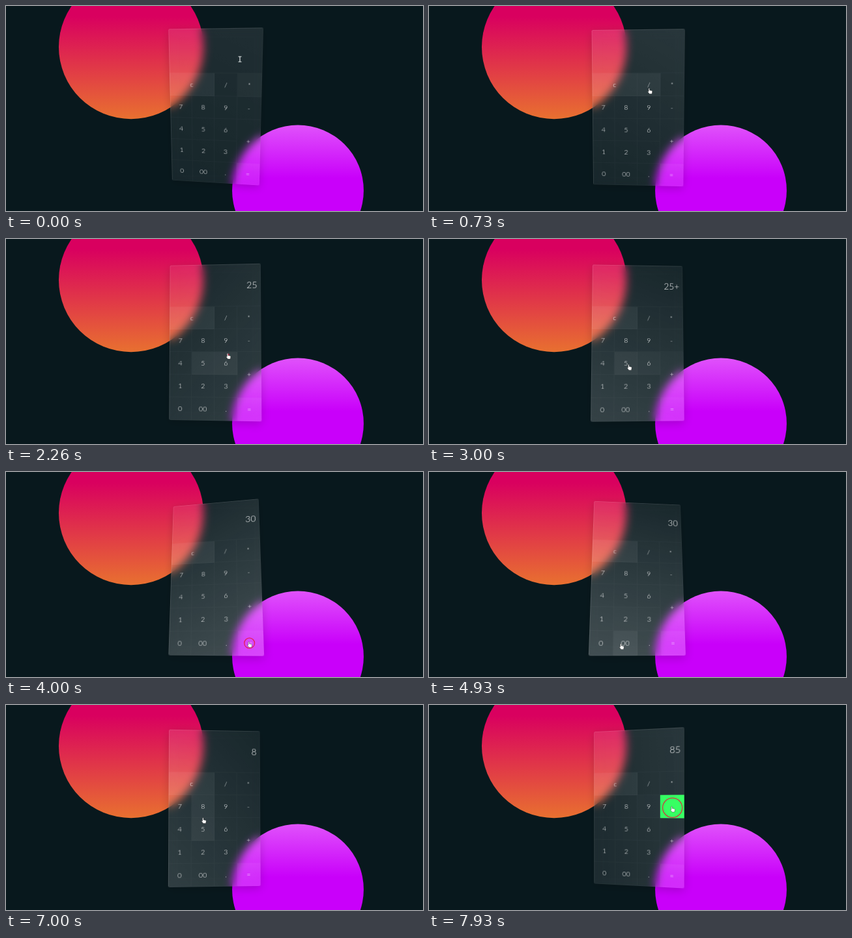
An HTML page for the animation above (8 s loop, 640 px wide and 316 px high).

```html
<!DOCTYPE html>
<html lang="en">
<head>
<meta charset="utf-8">
<title>Glass calculator</title>
<style>
  html, body { margin: 0; width: 100%; height: 100%; overflow: hidden; background: #08181d; }
  #stage { position: relative; width: 640px; height: 316px; overflow: hidden; }
  .ball { position: absolute; inset: 0; }
  .warm { background: linear-gradient(#d9005f 5%, #e87030 55%); clip-path: circle(22% at 30% 20%); }
  .violet { background: linear-gradient(#e052fb 58%, #c900fa 84%); clip-path: circle(20% at 70% 90%); }
  #card {
    position: absolute; left: 249.7px; top: 38px; width: 140.6px; height: 241.2px;
    border-radius: 3px; background: rgba(255,255,255,.06);
    backdrop-filter: blur(7px);
    box-shadow: 0 4px 14px rgba(0,0,0,.17), inset .5px .5px 0 rgba(255,255,255,.2);
    font-family: Lato, sans-serif; font-weight: 300; color: #fff;
  }
  #keys { position: absolute; inset: 0; display: grid;
    grid-template: 65.7px repeat(5, 35.1px) / repeat(4, 35.15px); }
  #keys div { display: flex; align-items: center; justify-content: center; box-sizing: border-box;
    border: solid rgba(255,255,255,.025); border-width: 0 1px 1px 0; font-size: 10.5px; }
  #keys #value { grid-column: span 4; justify-content: flex-end; padding: 1px 4px 0 0; font-size: 14px; }
  .c { grid-column: span 2; }
  .plus { grid-row: span 2; }
  #glare { position: absolute; inset: 0; overflow: hidden; border-radius: 3px; }
  #glare i { position: absolute; left: -70.3px; top: -20px; width: 281.2px; height: 281.2px;
    background: linear-gradient(0deg, rgba(255,255,255,0), #fff); }
  #overlay { position: absolute; left: 0; top: 0; }
</style>
</head>
<body>
<div id="stage">
  <div class="ball warm"></div>
  <div class="ball violet"></div>
  <div id="card">
    <div id="keys"><div id="value"></div></div>
    <div id="glare"><i></i></div>
  </div>
  <svg id="overlay" width="640" height="316">
    <g id="pointer">
      <circle id="ring" cx="1" cy="2" fill="none" stroke="#e6183c" stroke-opacity=".85" stroke-width="1.3"/>
      <path id="hand" fill="#fff" stroke="#222" stroke-width=".4"
        d="M-.8 .3Q0 -.6 .7 .3V3L4 3.7Q5 4 4.8 5.2L4.2 8.6H.4L-2.2 5.2Q-2.3 4.2 -.8 5Z"/>
      <path id="beam" fill="none" stroke="#dfe5e6" stroke-width="1.2"
        d="M-2.5 -4H-.6L0 -3.5L.6 -4H2.5M-2.5 4H-.6L0 3.5L.6 4H2.5M0 -3.5V3.5"/>
    </g>
  </svg>
</div>
<script>
const $ = id => document.getElementById(id);
const LOOP = 8000, FPS = 15, FADE = 500, HOLD = 100;
const MAX_TILT = 15, MAX_GLARE = .2;
const LEFT = 249.7, TOP = 38, WIDTH = 140.6, HEIGHT = 241.2, GRID_TOP = 103.7, CELL = 35.13;
const ARRIVE = 180, LEAVE = 200, BOW = .35;

const layout = ['c c / *', '7 8 9 -', '4 5 6 +', '1 2 3 +', '0 00 . =']
  .map(row => row.split(' '));
const tinted = ['c', '='];

const keys = {};
for (const label of new Set(layout.flat())) {
  const key = keys[label] = document.createElement('div');
  key.textContent = label;
  if (label === 'c') key.className = 'c';
  if (label === '+') key.className = 'plus';
  $('keys').append(key);
}

// Middle of all cells that a key covers
function centreOf(label) {
  const cells = layout.flatMap((row, r) =>
    row.flatMap((name, c) => name === label ? [[c, r]] : []));
  const mean = axis => cells.reduce((sum, cell) => sum + cell[axis] + .5, 0) / cells.length;
  return { x: LEFT + mean(0) * CELL, y: GRID_TOP + mean(1) * CELL };
}

function press(at, label, dx = 0, dy = 0) {
  const { x, y } = centreOf(label);
  return { at, label, x: x + dx, y: y + dy };
}

const presses = [
  press(1580, '2', 6, 4), press(2030, '5'), press(2480, '+'), press(3120, '5', 4, 2),
  press(3850, '='), press(5020, '00', -8, 3), press(6140, 'c', -3, 4),
  press(6740, '8'), press(7240, '5'), press(7900, '-'),
];
const visits = [press(-380, '*'), { at: 0, x: 359, y: 82 }, ...presses];

// The pointer rests around each visit and travels between them in a shallow arc.
function pointerAt(t) {
  const i = Math.max(0, visits.findLastIndex(visit => visit.at <= t));
  const from = visits[i], to = visits[i + 1] ?? from;
  const begin = from.at + LEAVE, end = to.at - ARRIVE;
  const p = Math.min(1, Math.max(0, (t - begin) / (end - begin)));
  const e = p * p * (3 - 2 * p), dx = to.x - from.x;
  return {
    x: from.x + dx * e,
    y: from.y + (to.y - from.y) * e - BOW * Math.abs(dx) * Math.sin(Math.PI * e),
  };
}

function keyAt({ x, y }) {
  return layout[Math.floor((y - GRID_TOP) / CELL)]?.[Math.floor((x - LEFT) / CELL)];
}

// Hover glow is instant on entry and fades after the pointer leaves.
function hoverLevels(t) {
  const levels = {};
  for (let age = 0; age < FADE; age += 20) {
    const label = keyAt(pointerAt(t - age));
    if (label) levels[label] ??= (1 - age / FADE) ** 1.5;
  }
  return levels;
}

function displayAt(t) {
  return presses.filter(p => p.at + HOLD <= t).reduce((text, { label }) => {
    if (label === 'c') return '';
    if (label === '=') return String(text.split('+').reduce((sum, n) => sum + Number(n), 0));
    return text + label;
  }, '');
}

function render(t) {
  const point = pointerAt(t), { x, y } = point, current = keyAt(point);
  const u = (x - LEFT) / WIDTH, v = (y - TOP) / HEIGHT;
  $('card').style.transform =
    `perspective(468px) rotateX(${MAX_TILT * (2 * v - 1)}deg) rotateY(${MAX_TILT * (1 - 2 * u)}deg)`;

  const glare = $('glare').firstElementChild.style;
  glare.transform = `rotate(${Math.atan2(x - LEFT - WIDTH / 2, TOP + HEIGHT / 2 - y)}rad)`;
  glare.opacity = v * MAX_GLARE;

  const since = t - (presses.findLast(p => p.at <= t)?.at ?? -Infinity);
  const levels = hoverLevels(t);
  for (const label in keys) {
    const active = label === current && since < HOLD;
    const glow = tinted.includes(label) ? 1 : levels[label] ?? 0;
    keys[label].style.background = active ? '#28ff57' : `rgba(255,255,255,${.055 * glow})`;
    keys[label].style.color = active ? '#192f00' : '';
  }
  $('value').textContent = displayAt(t);

  const typing = y < GRID_TOP;
  $('pointer').setAttribute('transform', `translate(${x} ${y})`);
  $('hand').style.display = typing ? 'none' : '';
  $('beam').style.display = typing ? '' : 'none';
  $('ring').setAttribute('r', 15 * Math.min(1, Math.max(0, (250 - since) / 190)));
}

const start = performance.now();
function tick() {
  const t = (performance.now() - start + 7) % LOOP;
  render(Math.floor(t * FPS / 1000) * 1000 / FPS);
  requestAnimationFrame(tick);
}
tick();
</script>
</body>
</html>
```
